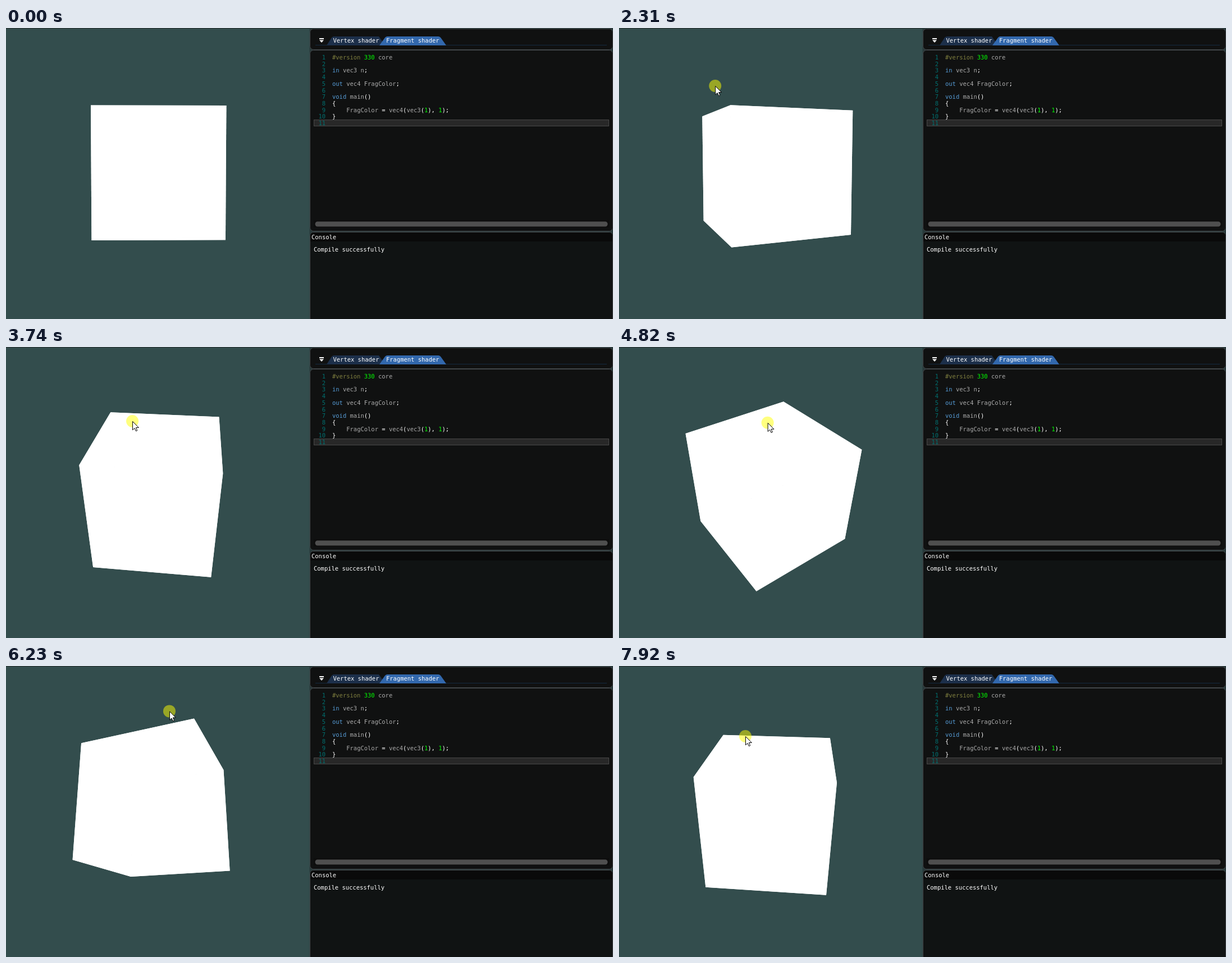
Animation of 1081x518 px, one loop 8000 ms. Source, as an HTML page with a canvas:

```html
<!DOCTYPE html>
<html lang="en">
<head>
<meta charset="utf-8">
<title>Shader editor</title>
<style>
  html, body { margin: 0; width: 100%; height: 100%; overflow: hidden; background: #334d4d; }
  svg, canvas { position: absolute; left: 0; top: 0; }
  text { font: 10.47px "DejaVu Sans Mono", monospace; fill: #fff; white-space: pre; }
</style>
</head>
<body>
<svg width="1081" height="518">
  <rect width="541" height="1" fill="#222c2c"/>
  <rect x="540.5" width="541" height="518" fill="#29393a"/>
  <g fill="#101111" stroke="#42474a">
    <rect x="541.5" y="1.5" width="539" height="37" rx="6"/>
    <rect x="541.5" y="39.5" width="539" height="322" rx="6"/>
    <rect x="541.5" y="363.5" width="539" height="170" rx="6" fill="#101313"/>
  </g>
  <path d="M542 380V370Q542 364 548 364H1074Q1080 364 1080 370V380Z" fill="#0a0a0a"/>

  <path d="M551 30.5H1070" stroke="#142b40"/>
  <path d="M571 31L580 17Q582 15 584 15H664L675 31Z" fill="#1c2f4a"/>
  <path d="M665 31L675 17Q677 15 679 15H770Q772 15 774 17L784 31Z" fill="#3268ad"/>
  <path d="M558 18H566V20H558ZM558 21.5H566L562 26Z" fill="#fff"/>
  <text x="582.5" y="26">Vertex shader</text>
  <text x="677" y="26">Fragment shader</text>

  <rect x="548.5" y="163.5" width="525" height="11" fill="#282828" stroke="#484848"/>
  <g id="code"></g>
  <rect x="548" y="342" width="526" height="13" fill="#0d0d0d"/>
  <rect x="550.5" y="344.5" width="521" height="9" rx="4.5" fill="#4f4f4f"/>

  <text x="544" y="376">Console</text>
  <text x="548" y="398">Compile successfully</text>
</svg>
<canvas id="stage" width="1081" height="518"></canvas>
<script>
const program = `#version 330 core

in vec3 n;

out vec4 FragColor;

void main()
{
    FragColor = vec4(vec3(1), 1);
}
`;

const tokenColor = token =>
  token[0] === '#' ? '#808040' :
  /^(in|out|void)$/.test(token) ? '#569cd6' :
  /^\d/.test(token) ? '#00ff00' :
  /^\w/.test(token) ? '#aaaaaa' : '#ffffff';

document.getElementById('code').innerHTML = program.split('\n').map((line, i) => {
  const y = Math.round(56 + i * 11.7);
  const spans = line.replace(/#?\w+|[^\w#]+/g, s => `<tspan fill="${tokenColor(s)}">${s}</tspan>`);
  return `<text x="569" y="${y}" text-anchor="end" style="fill:#007070">${i + 1}</text>` +
         `<text x="581" y="${y}">${spans}</text>`;
}).join('');

// The pointer enters, moves to the grab point, presses, then drags the view.
const enter = 410, press = 1770, lag = 40;
const grab = { x: 149.5, y: 101 };
const stroke = (start, end, x, y) => ({ start, end, x, y });
const strokes = [
  stroke(enter, 550, 321, 367),
  stroke(930, 1540, grab.x, grab.y),
  stroke(2000, 2780, 204, 106),
  stroke(2830, 3090, 216, 106),
  stroke(3350, 3740, 225, 132),
  stroke(3740, 3900, 228, 136),
  stroke(4260, 4800, 263, 135),
  stroke(4800, 5150, 290, 131),
  stroke(5350, 6290, 291, 77),
  stroke(6490, 6920, 278, 104),
  stroke(6920, 7320, 267, 112),
  stroke(7320, 7880, 225, 125)
];

function pointerAt(t) {
  let x = 874, y = 498;
  for (const s of strokes) {
    let u = Math.min(1, Math.max(0, (t - s.start) / (s.end - s.start)));
    if (s.end < press) u = u * u * (3 - 2 * u);
    x += (s.x - x) * u;
    y += (s.y - y) * u;
  }
  return { x, y };
}

// Dragging turns the view by about 1.1 degrees per pixel, slightly late.
function viewAt(t) {
  const p = t < press ? grab : pointerAt(t - lag);
  const rad = Math.PI / 180;
  return { yaw: (0.7 + 1.11 * (p.x - grab.x)) * rad, pitch: (1.9 + 1.11 * (p.y - grab.y)) * rad };
}

const ctx = document.getElementById('stage').getContext('2d');
const arrow = new Path2D('M0 0V15.2L3.5 12L5.9 17.2L8.2 16.2L5.9 11H10.8Z');
const faces = ['0132', '4576', '0154', '2376', '0264', '1375'];

// Bits of n pick the sign of each axis of a unit cube's corner.
function project(n, { yaw, pitch }) {
  const x = (n & 1) - 0.5, y = (n >> 1 & 1) - 0.5, z = (n >> 2) - 0.5;
  const sx = x * Math.cos(yaw) + z * Math.sin(yaw);
  const sz = z * Math.cos(yaw) - x * Math.sin(yaw);
  const scale = 648 / (3.2 - y * Math.sin(pitch) - sz * Math.cos(pitch));
  return [270.5 + scale * sx, 254.5 - scale * (y * Math.cos(pitch) - sz * Math.sin(pitch))];
}

function drawCube(view) {
  ctx.fillStyle = '#fff';
  for (const face of faces) {
    ctx.beginPath();
    for (const n of face) ctx.lineTo(...project(+n, view));
    ctx.fill();
  }
}

function drawPointer({ x, y }, pressed) {
  if (pressed) {
    ctx.fillStyle = 'rgba(255,255,0,.5)';
    ctx.beginPath();
    ctx.arc(x, y, 11, 0, 2 * Math.PI);
    ctx.fill();
  }
  ctx.save();
  ctx.translate(x + 0.5, y + 0.5);
  ctx.fillStyle = '#fff';
  ctx.strokeStyle = '#000';
  ctx.fill(arrow);
  ctx.stroke(arrow);
  ctx.restore();
}

function frame(now) {
  const t = now % 8000;
  ctx.clearRect(0, 0, 1081, 518);
  drawCube(viewAt(t));
  if (t >= enter) drawPointer(pointerAt(t), t >= press);
  requestAnimationFrame(frame);
}
requestAnimationFrame(frame);
</script>
</body>
</html>
```
